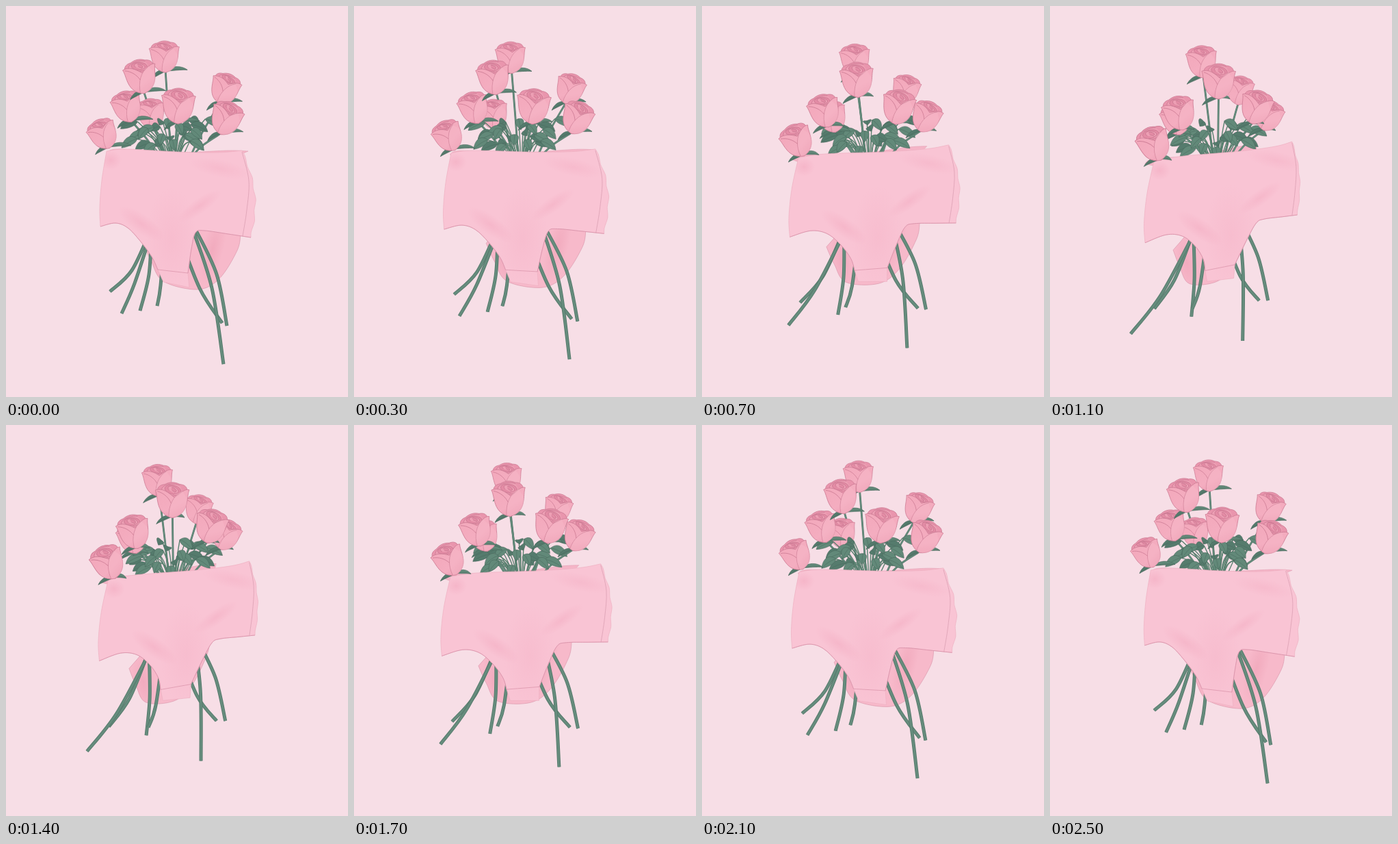
An HTML page with a canvas for the animation above (2600 ms loop, 500 by 571 pixels).

```html
<!DOCTYPE html>
<html lang="en">
<head>
<meta charset="utf-8">
<title>Roses</title>
<style>
html, body { margin: 0; width: 100%; height: 100%; overflow: hidden; background: #f7dee6; }
canvas { display: block; }
</style>
</head>
<body>
<canvas id="c" width="500" height="571"></canvas>
<script>
const ctx = document.getElementById('c').getContext('2d');
const STEP = 100, COUNT = 26, HALF = 12;
const AXIS = 245, HORIZON = 60, DEPTH = 1000;
const RAD = Math.PI / 180, MAX_TURN = 52 * RAD, GOLDEN = 137.5 * RAD;
const GREEN = '#628979', SHADOW = '#557b6d', DARK = '#48695d', LINE = '#d790a7';
let u = 0; // progress of the turn, 0 to 1

// Turn a point about the upright axis; y shifts with depth below the horizon
function project(x, y, z) {
  const dx = x - AXIS, c = Math.cos(u * MAX_TURN), s = Math.sin(u * MAX_TURN);
  const depth = z * c - dx * s;
  return {
    x: AXIS + dx * c + z * s,
    y: y + (depth - z) * (y - HORIZON) / DEPTH - 0.04 * u * (y - 260),
    z: depth
  };
}

// The front cloth is a slanted sheet, bulging at the hips and flat at the crotch
function front(x, y) {
  const dx = x - AXIS;
  const fade = Math.max(0, Math.min(1, (400 - y) / 70));
  return project(x, y, 0.5 * dx + 34 * fade * (1 - (dx / 115) ** 2));
}

function back(x, y) {
  return project(x, y, 0.2 * (x - AXIS) - 38);
}

const map = (pts, fn) => pts.map(p => fn(...p));

// Smooth curve through points, added to the current path
function curve(pts, start) {
  const pt = i => pts[Math.max(0, Math.min(pts.length - 1, i))];
  if (start) ctx.moveTo(pt(0).x, pt(0).y); else ctx.lineTo(pt(0).x, pt(0).y);
  for (let i = 0; i < pts.length - 1; i++) {
    const a = pt(i - 1), b = pt(i), c = pt(i + 1), d = pt(i + 2);
    ctx.bezierCurveTo(b.x + (c.x - a.x) / 6, b.y + (c.y - a.y) / 6,
      c.x - (d.x - b.x) / 6, c.y - (d.y - b.y) / 6, c.x, c.y);
  }
}

function stroke(color, width) {
  ctx.strokeStyle = color;
  ctx.lineWidth = width;
  ctx.stroke();
}

function line(pts, color, width) {
  ctx.beginPath();
  curve(pts, true);
  stroke(color, width);
}

function stalk(pts, width) {
  line(pts, '#55796b', width);
  line(pts, '#668c7d', width * 0.65);
}

function leaf(x, y, dx, dy, w, fill = GREEN) {
  const len = Math.hypot(dx, dy) || 1, nx = -dy / len * w, ny = dx / len * w;
  const side = (s, k) => [x + dx * k + nx * s, y + dy * k + ny * s - 4];
  ctx.beginPath();
  ctx.moveTo(x, y);
  ctx.bezierCurveTo(...side(1, 0.25), ...side(0.8, 0.75), x + dx, y + dy);
  ctx.bezierCurveTo(...side(-0.8, 0.75), ...side(-1, 0.25), x, y);
  ctx.fillStyle = fill;
  ctx.fill();
  stroke(DARK, 0.6);
  ctx.beginPath();
  ctx.moveTo(x, y);
  ctx.quadraticCurveTo(x + dx / 2, y + dy / 2 - 4, x + dx, y + dy);
  stroke(DARK, 0.5);
}

function shade(p, rx, ry, turn, rgb, alpha) {
  ctx.save();
  ctx.translate(p.x, p.y);
  ctx.rotate(turn * RAD);
  ctx.scale(rx, ry);
  const g = ctx.createRadialGradient(0, 0, 0, 0, 0, 1);
  g.addColorStop(0, `rgba(${rgb},${alpha})`);
  g.addColorStop(1, `rgba(${rgb},0)`);
  ctx.fillStyle = g;
  ctx.fillRect(-1, -1, 2, 2);
  ctx.restore();
}

// Centre of each rose in space; the first hangs over the waistband
const roses = [
  [142, 187, -35], [212, 157, -51], [320, 121, -20], [232, 74, -19],
  [177, 147, -16], [322, 164, 33], [197, 103, 42], [252, 146, 68]
];

// Size, lean and openness follow from where the rose stands
function placeRose(p) {
  const r = project(...p);
  r.size = 23 * (1 + r.z / 700);
  r.tilt = (r.x - AXIS) * 0.24 * RAD;
  r.open = Math.max(0.12, Math.min(0.5, 0.25 + r.z / 250));
  r.bx = r.x - Math.sin(r.tilt) * r.size * 0.95;
  r.by = r.y + Math.cos(r.tilt) * r.size * 0.95;
  return r;
}

function roseStem({ x, bx, by }) {
  const foot = AXIS + (x - AXIS) * 0.3;
  stalk([{ x: bx, y: by }, { x: bx * 0.4 + foot * 0.6, y: by * 0.4 + 130 }, { x: foot, y: 224 }], 2.8);
}

function sepals({ bx, by }) {
  leaf(bx, by, -20 - 4 * u, 11, 4, SHADOW);
  leaf(bx, by, 32 - 16 * u, -2 + 4 * u, 4);
}

function bloom({ x, y, size, open, tilt }) {
  const lip = -0.62 + open * 0.55;
  const edge = () => stroke('#cf7f97', 0.035);
  ctx.save();
  ctx.translate(x, y);
  ctx.rotate(tilt);
  ctx.scale(size * 0.95, size * 1.04);

  // scalloped back petals
  ctx.beginPath();
  ctx.moveTo(-0.92, -0.5);
  for (let i = 1; i <= 24; i++) {
    const a = Math.PI * i / 24;
    ctx.lineTo(-0.92 * Math.cos(a), -0.5 - Math.sin(a) * 0.44 - 0.05 * Math.abs(Math.sin(3 * a)));
  }
  ctx.bezierCurveTo(.7, .2, -.7, .2, -.92, -.5);
  ctx.fillStyle = '#e995ad';
  ctx.fill();
  edge();

  // inner whorl
  for (let i = 0; i < 4; i++) {
    const k = 0.66 - i * 0.16;
    ctx.beginPath();
    ctx.ellipse(0.03 * i, -0.68 + open * 0.2, k, k * (0.25 + open * 0.5), 0.2 * i, 0.3 + i, 5.5 + i);
    ctx.fillStyle = i % 2 ? '#e38ca5' : '#ed9fb4';
    ctx.fill();
    stroke('#c87690', 0.03);
  }

  // cup
  const g = ctx.createLinearGradient(-0.4, -0.6, 0.3, 1);
  g.addColorStop(0, '#f3a9bc');
  g.addColorStop(0.6, '#f4adc0');
  g.addColorStop(1, '#eb9cb2');
  ctx.beginPath();
  ctx.moveTo(-1.04, -.56);
  ctx.bezierCurveTo(-.84, -.15, -1.08, .75, 0, 1);
  ctx.bezierCurveTo(1.08, .75, .84, -.15, 1.04, -.56);
  ctx.bezierCurveTo(.75, -.66, .5, lip, .12, lip + .2);
  ctx.bezierCurveTo(-.2, lip - .05, -.6, -.72, -1.04, -.56);
  ctx.fillStyle = g;
  ctx.fill();
  edge();

  // overlapping front petals
  ctx.beginPath();
  ctx.moveTo(.62, -.5);
  ctx.bezierCurveTo(.1, -.3, -.25, .3, -.22, .93);
  edge();
  ctx.bezierCurveTo(.4, 1.08, 1, .6, .88, -.1);
  ctx.fillStyle = 'rgba(247,184,200,.45)';
  ctx.fill();
  ctx.beginPath();
  ctx.moveTo(-.92, -.5);
  ctx.bezierCurveTo(-.5, -.4, -.2, -.1, -.08, .18);
  edge();
  ctx.restore();
}

// Leaves spiral around the axis by the golden angle
function foliage() {
  const leaves = [];
  for (let i = 0; i < 26; i++) {
    const a = i * GOLDEN, r = 20 + i * 7 % 40;
    const p = project(AXIS - 8 + r * Math.sin(a), 164 + i * 11 % 40, r * Math.cos(a));
    const out = a + u * MAX_TURN;
    leaves.push({ ...p, dx: 25 * Math.sin(out), dy: 11 + 5 * Math.cos(out) });
  }
  leaves.sort((a, b) => a.z - b.z);
  for (const { x, y } of leaves) {
    const foot = AXIS + (x - AXIS) * 0.25;
    line([{ x: foot, y: 224 }, { x: (foot + x) / 2, y: (y + 210) / 2 }, { x, y }], '#58806f', 1.4);
  }
  for (const { x, y, z, dx, dy } of leaves) leaf(x, y, dx, dy, 9, z < 0 ? SHADOW : GREEN);
}

function backPanel() {
  ctx.beginPath();
  curve(map([[200, 345], [212, 372], [230, 402], [280, 414], [312, 398], [338, 357], [343, 332]], back), true);
  ctx.lineTo(AXIS + 10, 270);
  ctx.closePath();
  ctx.fillStyle = '#f7b9ca';
  ctx.fill();
  stroke(LINE, 0.6);
  ctx.save();
  ctx.clip();
  shade(back(302, 355), 16, 55, 15, '234,150,172', 0.4);
  shade(back(225, 370), 16, 42, -10, '232,145,170', 0.35);
  ctx.restore();
}

function backRim() {
  ctx.beginPath();
  curve(map([[148, 214], [165, 209], [245, 214], [325, 211], [354, 212]], back), true);
  ctx.lineTo(300, 235);
  ctx.lineTo(160, 235);
  ctx.closePath();
  ctx.fillStyle = '#f5b5c7';
  ctx.fill();
  stroke('#e3a0b4', 0.6);
}

function frontPanel() {
  const frill = Array.from({ length: 17 }, (_, i) => {
    const t = i / 16;
    return [345 + 13 * t + 12 * Math.sin(Math.PI * t) + 1.2 * Math.sin(8 * Math.PI * t), 211 + 127 * t];
  });
  const top = map([[147, 212], [175, 209], [250, 213], [310, 214], [345, 211]], front);
  const side = map(frill, front);
  const legR = map([[358, 338], [325, 333], [290, 328], [277, 331], [271, 355], [266, 390]], front);
  const base = map([[268, 411], [230, 403]], front);
  const legL = map([[222, 385], [213, 366], [196, 343], [178, 324], [160, 317], [138, 322]], front);
  const left = map([[138, 322], [137, 295], [140, 255], [147, 212]], front);

  ctx.beginPath();
  [top, side, legR, base, legL, left].forEach((p, i) => curve(p, !i));
  ctx.closePath();
  ctx.fillStyle = '#f9c4d4';
  ctx.fill();
  stroke('#eeb0c2', 0.7);

  ctx.save();
  ctx.clip();
  const fold = '240,160,184';
  shade(front(198, 318), 40, 14, 35, fold, 0.36);
  shade(front(312, 237), 45, 13, 12, fold, 0.26);
  shade(front(283, 292), 38, 11, -35, fold, 0.34);
  shade(front(153, 225), 16, 14, 0, fold, 0.4);
  shade(front(242, 340), 38, 75, 0, fold, 0.2);
  ctx.restore();

  line(legR, LINE, 0.8);
  line(legL, LINE, 0.8);
  line([legL[0], legR[5]], LINE, 0.7);
  line(map([[345, 213], [355, 255], [352, 298], [346, 336]], front), '#dba0b3', 0.8);
}

// Start x, then knee x and y, then the tip in space
const stems = [
  [212, 184, 386, 152, 417, -43],
  [214, 188, 405, 169, 449, -102],
  [213, 209, 392, 196, 445, -9],
  [232, 226, 408, 221, 438, -28],
  [250, 283, 412, 316, 463, 20],
  [277, 308, 392, 323, 467, 31],
  [273, 301, 412, 318, 523, -13]
];

function lowerStems() {
  for (const [sx, kx, ky, tx, ty, tz] of stems) {
    const sz = (sx - AXIS) * 0.6;
    stalk([project(sx, 326, sz), project(kx, ky, (sz + tz) / 2), project(tx, ty, tz)], 5);
  }
}

function draw() {
  ctx.fillStyle = '#f7dee6';
  ctx.fillRect(0, 0, 500, 571);
  ctx.lineJoin = 'round';
  backPanel();
  lowerStems();
  backRim();
  const [low, ...others] = roses.map(placeRose);
  others.sort((a, b) => a.z - b.z);
  others.forEach(roseStem);
  bloom(others[0]);
  foliage();
  others.slice(1).forEach(r => { sepals(r); bloom(r); });
  frontPanel();
  sepals(low);
  bloom(low);
}

function frame(now) {
  const n = Math.floor(now / STEP) % COUNT;
  const p = n === COUNT - 1 ? -0.5 : HALF - Math.abs(HALF - n);
  const k = p / HALF;
  u = 0.75 * (1 - Math.cos(Math.PI * k)) / 2 + 0.25 * k;
  draw();
  requestAnimationFrame(frame);
}

frame(0);
</script>
</body>
</html>
```
